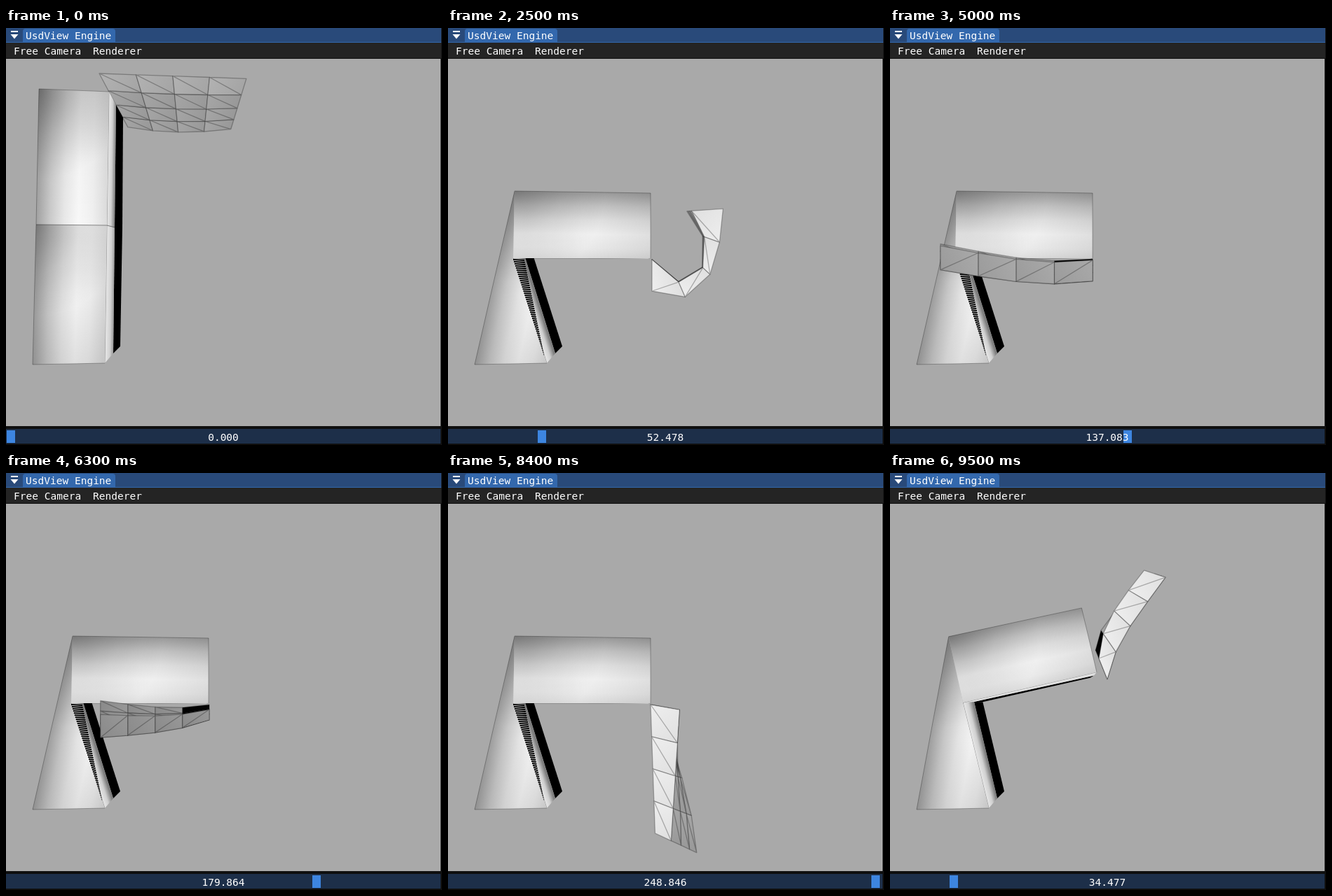
Animation, 622 px wide and 596 px high, one loop 9.6 s. Source, as an HTML page with a canvas:

```html
<!DOCTYPE html>
<html lang="en">
<head>
<meta charset="utf-8">
<title>UsdView Engine</title>
<style>
  html, body { margin: 0; width: 100%; height: 100%; overflow: hidden; background: #0f0f0f; }
  canvas { display: block; }
</style>
</head>
<body>
<canvas id="stage" width="622" height="596"></canvas>
<script>
const ctx = document.getElementById('stage').getContext('2d');
const LOOP = 9600, STEP = 100, LAST = 250.563;
const RAD = Math.PI / 180;

const mix = (a, b, k) => a + (b - a) * k;
const mixPoint = (p, q, k) => [mix(p[0], q[0], k), mix(p[1], q[1], k)];
const middle = (p, q) => mixPoint(p, q, 0.5);

// Finds the two keys around x and how far x lies between them.
function between(keys, x, at) {
  let i = keys.findIndex(k => at(k) >= x);
  if (i < 0) i = keys.length - 1;
  const b = keys[i], a = keys[Math.max(0, i - 1)];
  const span = at(b) - at(a);
  return [a, b, span ? Math.min(1, (x - at(a)) / span) : 1];
}

// Time code per step: starts late, stalls twice and wraps at the end.
const clock = [[8, 0], [13, 15.404], [25, 52.478], [39, 100.884], [63, 179.864], [84, 248.846], [95, 285.04]];

function timeCode(step) {
  if (step > 25 && step < 29) step = 25;
  if (step > 73 && step < 80) step = 73;
  const [a, b, k] = between(clock, step, key => key[0]);
  return mix(a[1], b[1], k) % LAST;
}

// --- cloth ---
// A ribbon leaves the hinge (x, y) at `heading` and turns by `bend` on its way.
// Its visible strip reaches `width` towards `across`; `root` and `tip` say how
// far the remaining cloth goes on (positive) or folds back behind (negative).
const pose = (at, x, y, shape) => ({ at, x, y, bend: 0, twist: 0, taper: 1, root: -1, tip: -1, ...shape });

const poses = [
  pose(0, 133, 65, { heading: 2, length: 52.5, across: 62, twist: 45, width: 28, taper: 0.87, root: 2.1, tip: 2.1, tone: 172 }),
  pose(15.404, 172, 120, { heading: -45, bend: 55, length: 50, across: 32, twist: 72, width: 50, taper: 0.45, root: 0, tip: 2.1, tone: 166 }),
  pose(34.477, 298, 265, { heading: -80, bend: 28, length: 36, across: 68, twist: -50, width: 32, root: -1.4, tip: -0.5, tone: 232 }),
  pose(52.478, 291, 376, { heading: 10, bend: -94, length: 48, across: -90, twist: -94, width: 45, root: 0, tip: 0.15, tone: 232 }),
  pose(100.884, 243, 330, { heading: 91, bend: 17, length: 50, across: 2, twist: 9, width: 46, root: -0.8, tip: -1.25, tone: 236 }),
  pose(131, 289, 331, { heading: 178, bend: 14, length: 57, across: 90, width: 32, tone: 165 }),
  pose(179.864, 290, 338, { heading: 170, bend: 12, length: 39, across: 90, width: 15, taper: 2.2, root: -1.45, tip: -1.6, tone: 146 }),
  pose(248.846, 289, 331, { heading: 88, length: 46, across: 10, twist: 15, width: 42, taper: 0.6, tip: 1.6, tone: 232 })
];

function clothAt(time) {
  const [a, b, k] = between(poses, time, p => p.at);
  const p = {};
  for (const name in a) p[name] = mix(a[name], b[name], k);

  const near = [], mid = [], far = [];
  let { x, y } = p;
  // A strongly twisted strip is seen edge-on halfway.
  const pinch = Math.min(0.7, (p.twist / 100) ** 6);
  for (let i = 0; i < 5; i++) {
    const u = i / 4;
    const side = (p.across + p.twist * u) * RAD;
    const w = p.width * mix(1, p.taper, u) * (1 - pinch * Math.sin(Math.PI * u));
    const fold = 1 + mix(p.root, p.tip, u);
    near.push([x, y]);
    mid.push([x + Math.cos(side) * w, y + Math.sin(side) * w]);
    far.push([x + Math.cos(side) * w * fold, y + Math.sin(side) * w * fold]);
    const turn = (p.heading + p.bend * (1 - (1 - i / 3) ** 2)) * RAD;
    x += Math.cos(turn) * p.length;
    y += Math.sin(turn) * p.length;
  }
  const rows = [near, ...[0, 0.39, 0.72, 1].map(v => mid.map((m, i) => mixPoint(m, far[i], v)))];
  return { rows, tone: p.tone };
}

// --- drawing helpers ---
const gray = v => `rgb(${v},${v},${v})`;
const shadow = alpha => `rgba(0,0,0,${alpha})`;

function rect(x, y, w, h, fill) {
  ctx.fillStyle = fill;
  ctx.fillRect(x, y, w, h);
}

function path(points) {
  ctx.beginPath();
  points.forEach(p => ctx.lineTo(p[0], p[1]));
}

function poly(points, fill) {
  path(points);
  ctx.fillStyle = fill;
  ctx.fill();
}

function stroke(points, color, width) {
  path(points);
  ctx.strokeStyle = color;
  ctx.lineWidth = width;
  ctx.stroke();
}

// Spreads colours evenly over a gradient.
function blend(gradient, ...colors) {
  colors.forEach((c, i) => gradient.addColorStop(i / (colors.length - 1), c));
  return gradient;
}

const linear = (p, q, ...colors) => blend(ctx.createLinearGradient(...p, ...q), ...colors);

// Gradient at right angles to the edge a-b; a negative width goes to its left.
function acrossEdge(a, b, width, ...colors) {
  const m = middle(a, b), dx = b[0] - a[0], dy = b[1] - a[1];
  const k = width / Math.hypot(dx, dy);
  return linear(m, [m[0] - dy * k, m[1] + dx * k], ...colors);
}

// Curved front face, darkest at the corner nearest the top left.
function face(jointL, jointR, endR, endL, width) {
  const quad = [jointL, jointR, endR, endL];
  const corner = [...quad].sort((p, q) => p[0] + p[1] - q[0] - q[1])[0];
  poly(quad, acrossEdge(jointL, endL, width, '#a0a0a0', '#cacaca', '#e8e8e8', '#f8f8f8', '#f0f0f0', '#dcdcdc'));
  poly(quad, blend(ctx.createRadialGradient(...corner, 0, ...corner, 130), shadow(0.26), shadow(0.1), shadow(0)));
  poly(quad, linear(middle(jointL, jointR), middle(endL, endR), shadow(0), shadow(0.02), shadow(0.1)));
  stroke([jointL, endL, endR], shadow(0.28), 1);
}

function side(a, b, c, d, width) {
  poly([a, b, c, d], acrossEdge(a, d, width, '#e8e8e8', '#d0d0d0', '#7c7c7c'));
  stroke([a, d], shadow(0.3), 1);
}

function drawArm(time) {
  const angle = Math.min(90, Math.max(0, 2.35 * (time - 1.75))) * RAD;
  const c = Math.cos(angle), s = Math.sin(angle);
  const turn = (x, y, px, py) => [px + (x - px) * c - (y - py) * s, py + (x - px) * s + (y - py) * c];

  // Perspective gives each depth its own apparent pivot.
  const jointL = turn(43, 281, 93, 283), topL = turn(47, 87, 93.5, 282.5);
  const jointR = turn(144, 282, 95, 280), topR = turn(147, 91, 99, 281);
  const jointS = turn(155, 285, 111, 284), topS = turn(157, 110, 111, 284);
  const jointB = turn(166, 285, 122.5, 285), topB = turn(167, 128, 122.5, 285);
  const baseL = [38, 481], baseR = [141, 479], baseS = [153, 465], baseB = [163, 455];

  poly([jointS, jointB, baseB, baseS], '#000');
  poly([jointS, jointB, topB, topS], '#000');
  side(jointR, jointS, baseS, baseR, -14);
  face(jointL, jointR, baseR, baseL, -100);
  if (s === 1) {
    // Overlapping surfaces flicker into hatching.
    for (let y = 330; y < 468; y += 3) {
      const k = (y - 330) / 140;
      const x0 = mix(93, 138, k), x1 = mix(109, 138, k);
      poly([[x0, y], [x1, y + 1], [x1, y + 3], [x0, y + 2]], '#000');
    }
  }
  side(jointR, jointS, topS, topR, 11);
  face(jointL, jointR, topR, topL, 100);
  if (s < 0.9) stroke([jointL, jointR, jointS], shadow(0.4), 1.2);
}

function drawCloth(time) {
  const { rows, tone } = clothAt(time);
  const back = Math.min(tone, 160);
  const unlit = back * Math.max(0, 1 - time / 10);
  for (let j = 3; j >= 0; j--) {
    for (let i = 0; i < 4; i++) {
      const a = rows[j][i], b = rows[j][i + 1], c = rows[j + 1][i + 1], d = rows[j + 1][i];
      const v = j === 0 ? tone : i === 0 ? unlit : back;
      poly([a, b, c, d], linear(a, c, gray(v + 6), gray(v - 8)));
      stroke([a, b, c, d, a, c], shadow(0.28), 1.3);
    }
  }
}

function label(text, x, y, align = 'left') {
  ctx.font = '14.53px "DejaVu Sans Mono", monospace';
  ctx.textAlign = align;
  ctx.fillStyle = '#fff';
  ctx.fillText(text, x, y);
}

function drawWindow(time) {
  rect(0, 0, 621, 20, '#294a7a');
  ctx.beginPath();
  ctx.roundRect(24, 1, 132, 19, [4, 4, 0, 0]);
  ctx.fillStyle = '#3368ad';
  ctx.fill();
  rect(0, 20, 621, 1, '#3368ad');
  rect(7, 4, 10, 2, '#fff');
  poly([[6.5, 9], [17.5, 9], [12, 15.5]], '#fff');
  label('UsdView Engine', 28, 16);

  rect(0, 21, 621, 22, '#242424');
  label('Free Camera', 11, 38);
  label('Renderer', 124, 38);

  rect(0, 573, 620, 21, '#1d2f49');
  rect(Math.floor(1.9 + time * 2.42), 575, 12, 18, '#3d85e0');
  label(time.toFixed(3), 310, 590, 'center');
}

function draw(ms) {
  const time = timeCode(Math.floor(ms % LOOP / STEP));
  rect(0, 0, 622, 596, '#0f0f0f');
  rect(0, 44, 620, 525, '#a9a9a9');
  // The cloth hangs behind the arm until it has swung through below it.
  const layers = [drawCloth, drawArm];
  if (time > 110) layers.reverse();
  layers.forEach(layer => layer(time));
  drawWindow(time);
}

const start = performance.now();
function tick() {
  draw(performance.now() - start);
  requestAnimationFrame(tick);
}
ctx.lineJoin = 'round';
tick();
</script>
</body>
</html>
```
